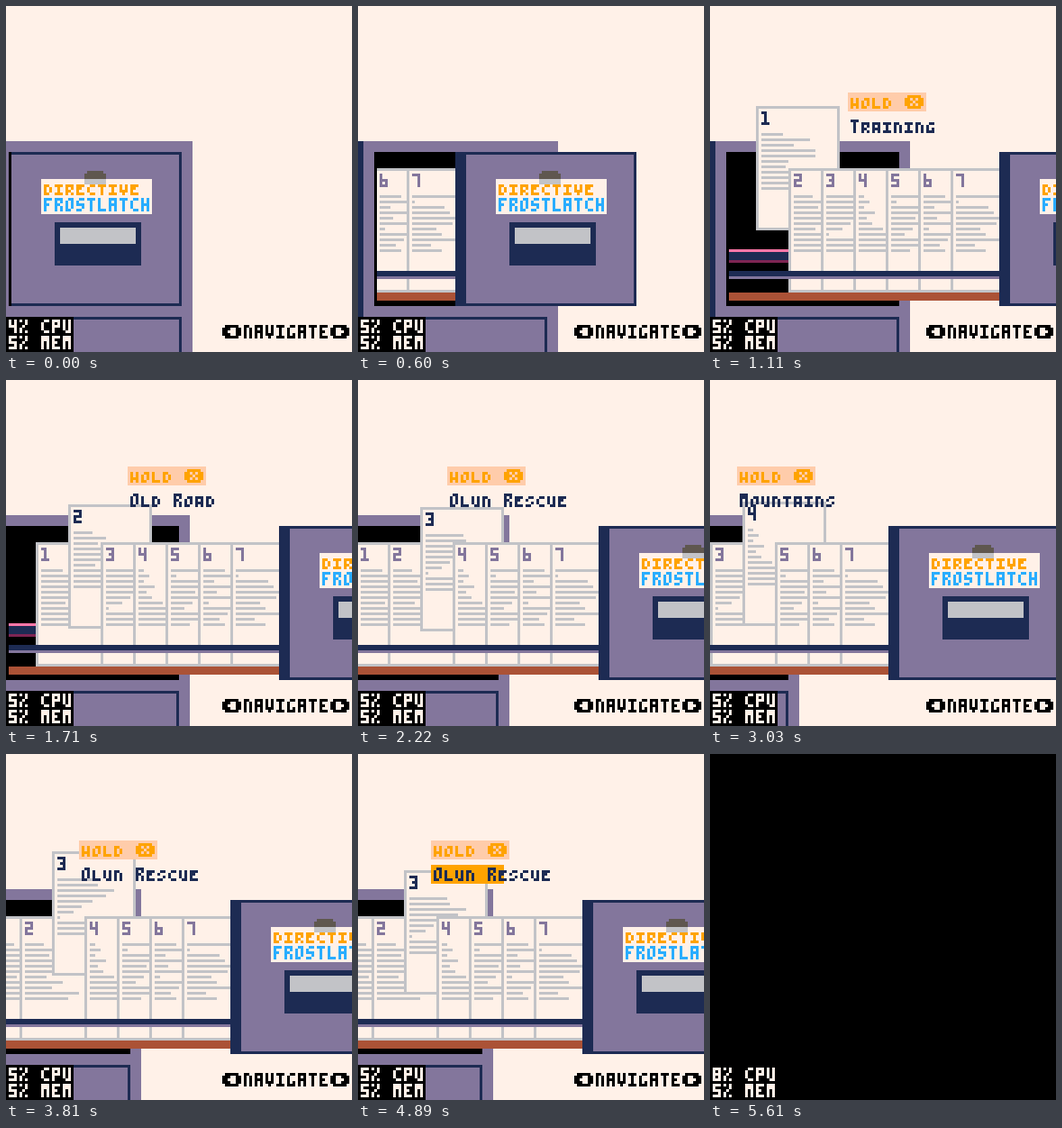
Animation, 384 px wide and 384 px high, one loop 5.7 s. Source, as an HTML page with a canvas:

```html
<!DOCTYPE html>
<html lang="en">
<head>
<meta charset="utf-8">
<title>Mission cabinet</title>
<style>
html, body { margin: 0; width: 100%; height: 100%; overflow: hidden; background: #fff1e8; }
canvas { display: block; }
</style>
</head>
<body>
<canvas width="384" height="384"></canvas>
<script>
const ctx = document.querySelector('canvas').getContext('2d');
const LOOP = 5700, UNIT = 3;
const CREAM = '#fff1e8', NAVY = '#1d2b53', LAVENDER = '#83769c', GREY = '#c2c3c7', BLACK = '#000',
  ORANGE = '#ffa300', BLUE = '#29adff', PEACH = '#ffccaa', BROWN = '#ab5236',
  PINK = '#ff77a8', PLUM = '#7e2553', STONE = '#5f574f';

// Stroke font on a 3x5 grid; lower case letters are small capitals.
const GLYPHS = {
  A: 'M0 4V0H2V4M0 2H2', C: 'M2 0H1M0 1V3M1 4H2', E: 'M2 0H0V4H2M0 2H1', F: 'M2 0H0V4M0 2H1',
  G: 'M2 0H1M0 1V4H2V3', H: 'M0 0V4M2 0V4M0 2H2', I: 'M0 0H2M1 0V4M0 4H2', L: 'M0 0V4H2',
  M: 'M0 4V0H2V4M0 1H2', N: 'M0 4V0H1M2 1V4', O: 'M2 3V0H1M0 1V4H1', P: 'M0 4V0H2V2H0',
  R: 'M0 4V0H2V1M0 2H1M2 3V4', S: 'M2 0H1M0 1V2H2V3M1 4H0', T: 'M0 0H2M1 0V4',
  U: 'M0 0V3M2 0V4H1', V: 'M0 0V3H2V0M1 3V4',
  '%': 'M0 0h.01M2 0V1M1 2h.01M0 3V4M2 4h.01',
  1: 'M0 0H1V4M0 4H2', 2: 'M0 0H2V2H0V4H2', 3: 'M0 0H2V4H0M1 2H2', 4: 'M0 0V2H2M2 0V4',
  5: 'M2 0H0V2H2V4H0', 6: 'M0 0V4H2V2H0', 7: 'M0 0H2V4', 8: 'M0 0H2V4H0ZM0 2H2',
  a: 'M0 4V1H2V4M0 3H2', c: 'M2 1H1M0 2V3M1 4H2', d: 'M1 1H0V4H1M2 2V3', e: 'M2 1H0V4H2M0 2H1',
  g: 'M2 1H1M0 2V4H2V3', h: 'M0 1V4M2 1V4M0 3H2', i: 'M0 1H2M1 1V4M0 4H2', l: 'M0 1V4H2',
  m: 'M0 4V1H2V4M0 2H2', n: 'M0 4V1H1M2 2V4', o: 'M2 3V1H1M0 2V4H1',
  r: 'M0 4V1H2V2M0 3H1M2 4h.01', s: 'M2 1H1M0 2h.01M2 3h.01M1 4H0', t: 'M0 1H2M1 1V4',
  u: 'M0 1V3M2 1V4H1', v: 'M0 1V3H2V1M1 3V4'
};
for (const key in GLYPHS) GLYPHS[key] = new Path2D(GLYPHS[key]);

const MISSIONS = ['Training', 'Old Road', 'Olun Rescue', 'Mountains', 'Tunnels', 'Last Run', 'Return'];
// Line lengths of the text on each page.
const LINES = [
  [8, 18, 12, 20, 20, 10, 9, 14, 12, 13, 10],
  [7, 12, 9, 11, 12, 10, 8, 14, 10, 20, 16],
  [14, 15, 21, 18, 13, 9, 6, 1, 12, 14, 11],
  [2, 4, 2, 6, 3, 5, 9, 12, 11, 12, 10],
  [11, 2, 12, 10, 9, 12, 8, 5, 10, 13, 7],
  [8, 11, 4, 10, 5, 12, 2, 11, 9, 6, 8],
  [18, 1, 12, 14, 17, 15, 9, 11, 16, 7, 11]
];
// Moments at which a page gets picked.
const PICKS = [[780, 1], [1605, 2], [2128, 3], [2715, 4], [2760, 5], [2815, 6], [2911, 4], [3035, 3]];
const HOLD = 3800, FILL = 3965, WIPE = 5490;

const decay = (ms, tau) => Math.exp(-Math.max(0, ms) / tau);

function rect(color, x, y, w, h) {
  ctx.fillStyle = color;
  ctx.fillRect(x, y, w, h);
}

function print(text, x, y, color) {
  ctx.strokeStyle = color;
  [...text].forEach((ch, i) => {
    if (!GLYPHS[ch]) return;
    ctx.save();
    ctx.translate(x + 4 * i + .5, y + .5);
    ctx.stroke(GLYPHS[ch]);
    ctx.restore();
  });
}

function disc(x, y, color) {
  rect(color, x + 1, y, 5, 5);
  rect(color, x, y + 1, 7, 3);
}

function arrow(x, y, left) {
  disc(x, y, BLACK);
  rect(CREAM, x + (left ? 3 : 2), y + 1, 2, 3);
  rect(CREAM, x + 2, y + 2, 3, 1);
}

function cross(x, y) {
  disc(x, y, ORANGE);
  for (const [dx, dy] of [[2, 1], [4, 1], [3, 2], [2, 3], [4, 3]]) rect(PEACH, x + dx, y + dy, 1, 1);
}

function drawCabinet(x) {
  rect(NAVY, x - 4, 50, 4, 78);
  rect(LAVENDER, x, 50, 72, 78);
  rect(BLACK, x + 4, 54, 64, 57);
  rect(NAVY, x + 4, 115, 64, 13);
  rect(LAVENDER, x + 5, 116, 62, 12);
}

function drawPage(n, x, y, picked) {
  rect(GREY, x, y, 31, 46);
  rect(CREAM, x + 1, y + 1, 29, 44);
  print(String(n), x + 2, y + 2, picked ? NAVY : LAVENDER);
  LINES[n - 1].forEach((w, i) => rect(GREY, x + 2, y + 10 + 2 * i, w, 1));
}

function drawFace(x) {
  rect(NAVY, x - 4, 54, 67, 57);
  rect(LAVENDER, x, 55, 62, 55);
  rect(CREAM, x + 11, 64, 41, 13);
  rect(STONE, x + 28, 61, 6, 1);
  rect(STONE, x + 27, 62, 8, 2);
  rect(GREY, x + 27, 64, 8, 2);
  print('directive', x + 12, 65, ORANGE);
  print('FROSTLATCH', x + 12, 71, BLUE);
  rect(NAVY, x + 16, 80, 32, 16);
  rect(GREY, x + 18, 82, 28, 6);
}

function drawDrawer(start, face, picked, lift) {
  ctx.save();
  ctx.beginPath();
  ctx.rect(start, 0, 300, 128);
  ctx.clip();
  const length = face - 4 - start;
  rect(PINK, start, 90, length, 1);
  rect(NAVY, start, 91, length, 3);
  rect(PLUM, start, 94, length, 1);
  for (let n = 1; n <= 7; n++) {
    drawPage(n, face - 94 + 12 * (n - 1), 60 - (n === picked ? lift : 0), n === picked);
  }
  rect(NAVY, start, 98, length, 2);
  rect(LAVENDER, start, 100, length, 1);
  rect(BROWN, start, 106, length, 3);
  drawFace(face);
  ctx.restore();
}

function drawLabel(x, name, fill) {
  rect(PEACH, x, 32, 29, 7);
  print('hold', x + 1, 33, ORANGE);
  cross(x + 21, 33);
  rect(ORANGE, x, 41, fill, 7);
  print(name, x + 1, 42, NAVY);
}

// Camera offset, picked page and time of the pick.
function selection(t) {
  let scroll = 0, picked = 0, since = 0;
  const glide = until => {
    const goal = 12 * Math.max(0, picked - 1);
    return goal + (scroll - goal) * decay(until - since, 145);
  };
  for (const [time, page] of PICKS) {
    if (time > t) break;
    scroll = glide(time);
    picked = page;
    since = time;
  }
  return { scroll: glide(t), picked, since };
}

function draw(t) {
  rect(CREAM, 0, 0, 128, 128);
  const { scroll, picked, since } = selection(t);
  const cabinet = Math.round(2 - 5 * decay(t, 130) - scroll);
  const open = Math.round(104 * Math.min(1, t / 1065) ** 2);
  const fill = Math.min(45, Math.max(0, Math.floor((t - FILL) / 34)));
  const press = t < HOLD ? 0 : Math.max(1, Math.round((8 + .8 * fill / 45) * (1 - decay(t - HOLD - 80, 130))));
  const lift = 25 - Math.round(25 * decay(t - since, 130)) - press;

  drawCabinet(cabinet);
  drawDrawer(cabinet + 5, cabinet + 5 + open, picked, lift);
  if (picked) drawLabel(cabinet + 49, MISSIONS[picked - 1], fill);

  arrow(80, 118, true);
  print('NAVIGATE', 88, 118, BLACK);
  arrow(120, 118, false);

  if (t >= WIPE) {
    const edge = Math.max(0, Math.round(128 - (t - WIPE) * 1.28));
    rect(BLACK, edge, 0, 128, 128);
  }
  rect(BLACK, 0, 115, 25, 13);
  print((t < 300 ? 4 : t < WIPE ? 5 : 8) + '% CPU', 1, 116, CREAM);
  print('5% MEM', 1, 122, CREAM);
}

ctx.scale(UNIT, UNIT);
ctx.lineWidth = 1;
ctx.lineCap = 'square';
const begin = performance.now();
function tick() {
  draw((performance.now() - begin) % LOOP);
  requestAnimationFrame(tick);
}
tick();
</script>
</body>
</html>
```
